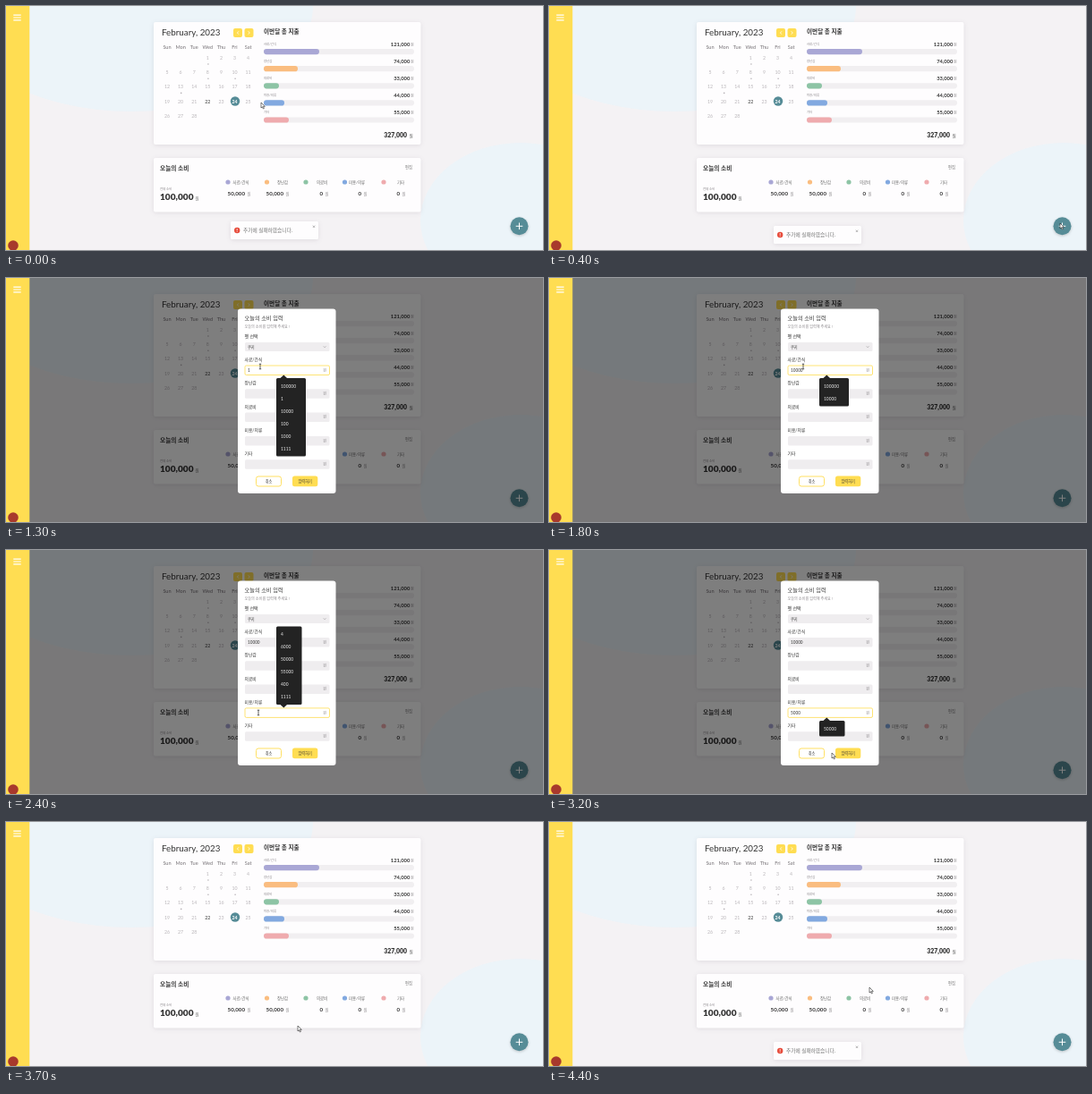
Animation, 600 px wide and 273 px high, one loop 4500 ms. Source, as an HTML page:

```html
<!DOCTYPE html>
<html lang="ko">
<head>
<meta charset="utf-8">
<title>오늘의 소비</title>
<style>
  html, body { margin: 0; width: 100%; height: 100%; overflow: hidden; background: #f4f2f4; }
  svg { display: block; width: 100vw; height: 100vh; }
  text { font-family: Lato, "Noto Sans CJK KR", "Noto Sans CJK", sans-serif; }
  .card { fill: #fefdfe; filter: drop-shadow(0 1.5px 2.5px rgba(60, 50, 70, .11)); }
  .anim { animation: 4.5s step-end infinite; }
</style>
</head>
<body>
<svg id="stage" viewBox="0 0 600 273" preserveAspectRatio="none"></svg>
<script>
const LOOP = 4500, STEP = 100;
const OPEN = 500, CLOSE = 3700;
const YELLOW = '#ffdd52', TEAL = '#568c97', INK = '#333', GRAY = '#8a868a';
const names = ['사료/간식', '장난감', '의료비', '미용/의류', '기타'];
const colors = ['#a9a7d5', '#fabd80', '#8dc4a5', '#82a9e0', '#efabae'];
let css = '', count = 0;

// ---- drawing helpers ----
const text = (x, y, str, size, fill = INK, weight = 400, anchor = 'start') =>
  `<text x="${x}" y="${y}" font-size="${size}" fill="${fill}" font-weight="${weight}" text-anchor="${anchor}">${str}</text>`;
const rect = (x, y, w, h, r, fill, extra = '') =>
  `<rect x="${x}" y="${y}" width="${w}" height="${h}" rx="${r}" fill="${fill}" ${extra}/>`;
const circle = (x, y, r, fill, extra = '') =>
  `<circle cx="${x}" cy="${y}" r="${r}" fill="${fill}" ${extra}/>`;
const line = (d, color, width) =>
  `<path d="${d}" fill="none" stroke="${color}" stroke-width="${width}"/>`;

// ---- motion helpers; key times sit slightly early so each tick is already set ----
const pct = ms => (Math.max(0, ms - 8) / LOOP * 100).toFixed(3) + '%';
const animated = (frames, body) => {
  const name = 'a' + count++;
  css += `@keyframes ${name}{${frames}}`;
  return `<g class="anim" style="animation-name:${name}">${body}</g>`;
};
const show = (from, to, body) => animated(
  `0%,100%{visibility:hidden}${pct(from)}{visibility:visible}${pct(to)}{visibility:hidden}`, body);

function track(points, body) {
  let frames = '';
  for (let t = 0; t < LOOP; t += STEP) {
    const i = points.findLastIndex(p => p[0] <= t);
    const a = points[i], b = points[i + 1] || a;
    const k = b === a ? 0 : (t - a[0]) / (b[0] - a[0]);
    const [x, y] = [1, 2].map(j => +(a[j] + (b[j] - a[j]) * k).toFixed(2));
    frames += `${pct(t)}{transform:translate(${x}px,${y}px)}`;
  }
  return animated(frames, body);
}

// ---- page ----
function calendar() {
  const colX = i => 180 + i * 15.1;
  let s = text(174, 33, 'February, 2023', 9.8);
  for (const x of [254, 266.5]) s += rect(x, 25, 10, 10, 2, YELLOW);
  s += line('M260 28.3l-1.6 1.7 1.6 1.7M270.7 28.3l1.6 1.7-1.6 1.7', '#fff', .8);
  ['Sun', 'Mon', 'Tue', 'Wed', 'Thu', 'Fri', 'Sat'].forEach((d, i) => {
    s += text(colX(i), 47.8, d, 5.6, '#757175', 400, 'middle');
  });
  s += circle(256, 106.5, 5.2, TEAL);
  for (let d = 1; d <= 28; d++) {
    const cell = d + 2, x = colX(cell % 7), y = 60 + Math.floor(cell / 7) * 16.2;
    const fill = d === 24 ? '#fff' : d === 22 ? '#666' : '#b8b4b8';
    s += text(x, y, d, 5.2, fill, d === 22 || d === 24 ? 700 : 400, 'middle');
    if ([1, 8, 10, 13].includes(d)) s += circle(x + .6, y + 5, .8, '#b5b0b5');
  }
  return s;
}

function spending() {
  const amounts = ['121,000', '74,000', '33,000', '44,000', '55,000'];
  const widths = [62, 38, 17, 23, 28];
  let s = text(288, 31, '이번달 총 지출', 6.6, INK, 700);
  names.forEach((n, i) => {
    const y = i * 19.1;
    s += text(288, 44 + y, n, 3.4, GRAY)
      + text(451.3, 45 + y, amounts[i], 5.8, INK, 700, 'end')
      + text(452, 45 + y, '원', 4, GRAY)
      + rect(288, 48 + y, 168, 6.2, 3.1, '#f1eff1')
      + rect(288, 48 + y, widths[i], 6.2, 3.1, colors[i]);
  });
  return s + text(448, 146.5, '327,000', 6.9, INK, 900, 'end') + text(450.5, 146.5, '원', 4.6, '#555');
}

function today() {
  const values = ['50,000', '50,000', '0', '0', '0'];
  const labelX = [262.5, 309, 353, 392, 441], endX = [267, 310, 354, 397, 440];
  let s = text(172, 183.5, '오늘의 소비', 6.7, INK, 700)
    + text(446, 182.3, '편집', 4.4, '#777')
    + text(172, 206, '전체 소비', 3.4, GRAY)
    + text(172, 216.5, '100,000', 10.1, INK, 900)
    + text(211.3, 216.5, '원', 4.8, '#777');
  names.forEach((n, i) => {
    s += circle(248 + i * 43.5, 197, 2.6, colors[i])
      + text(labelX[i], 198.7, n, 4.4, '#666', 400, 'middle')
      + text(endX[i], 212.2, values[i], 6.2, INK, 700, 'end')
      + text(endX[i] + 2.5, 212.2, '원', 4.2, GRAY);
  });
  return s;
}

const page = () => rect(0, 0, 600, 273, 0, '#f4f2f4')
  + '<g fill="#ecf4f9"><ellipse cx="140" cy="0" rx="203" ry="118"/><ellipse cx="575" cy="240" rx="112" ry="87"/></g>'
  + rect(165, 18, 298.5, 137, 2, '', 'class="card"')
  + rect(165, 170, 298.5, 60.5, 2, '', 'class="card"')
  + calendar() + spending() + today()
  + circle(573.5, 246.3, 10, TEAL, 'style="filter:drop-shadow(0 1.5px 1.5px rgba(0,0,0,.2))"')
  + line('M569.7 246.3h7.6M573.5 242.5v7.6', '#fff', 1);

// ---- dialog ----
const fieldY = i => 98 + i * 26.3;
const focusRing = i => rect(267, fieldY(i), 94.5, 10.5, 1.5, '#fff', `stroke="${YELLOW}" stroke-width=".8"`)
  + text(356, fieldY(i) + 6.8, '원', 4, GRAY, 400, 'middle');

function typed(i, start, value) {
  let s = '';
  for (let n = 1; n <= value.length; n++) {
    const from = start + (n - 1) * STEP;
    s += show(from, n < value.length ? from + STEP : CLOSE,
      text(270, fieldY(i) + 7, value.slice(0, n), 4.7));
  }
  return s;
}

function suggest(from, to, top, width, items, below = true) {
  const h = items.length * 14 + 3.5, tip = below ? top : top + h, dir = below ? -3.5 : 3.5;
  let s = rect(302, top, width, h, 1.5, '#232323')
    + `<path d="M306.5 ${tip}L310.3 ${tip + dir}L314 ${tip}z" fill="#232323"/>`;
  items.forEach((v, i) => { s += text(307, top + 10.7 + i * 14, v, 4.9, '#eee'); });
  return show(from, to, s);
}

function dialog() {
  let s = rect(0, 0, 600, 273, 0, '#000', 'opacity=".5"')
    + rect(259, 34.5, 109.5, 206.5, 3, '#fff')
    + text(266.5, 47.2, '오늘의 소비 입력', 6.2)
    + text(266.5, 55.8, '오늘의 소비를 입력해 주세요 !', 4.1, GRAY)
    + text(266.5, 67, '펫 선택', 5)
    + rect(267, 72, 94.5, 10, 1.5, '#efedef')
    + text(270, 78.7, '쿠키', 4.2)
    + line('M354.8 76.4l1.3 1.3 1.3-1.3', GRAY, .6);
  names.forEach((n, i) => {
    const y = fieldY(i);
    s += text(266.5, y - 5, n, 4.8)
      + rect(267, y, 94.5, 10.5, 1.5, '#efedef')
      + text(356, y + 6.8, '원', 4, GRAY, 400, 'middle');
  });
  s += rect(279.5, 222, 28, 11, 2.5, '#fff', `stroke="${YELLOW}" stroke-width=".9"`)
    + text(293.5, 229.2, '취소', 4.2, INK, 400, 'middle')
    + rect(320, 221.6, 28.3, 11.6, 2.5, YELLOW)
    + text(334.2, 229.2, '입력하기', 4.2, INK, 400, 'middle');
  // the visibility of nested parts ends before the dialog closes
  const body = show(OPEN, CLOSE, s);
  return body
    + show(1200, 2300, focusRing(0)) + show(2300, 3400, focusRing(3))
    + typed(0, 1300, '10000') + typed(3, 2600, '5000')
    + suggest(1300, 1400, 112, 33, ['100000', '1', '10000', '100', '1000', '1111'])
    + suggest(1400, 1600, 112, 33, ['100000', '10000', '100', '1000'])
    + suggest(1600, 1700, 112, 33, ['100000', '10000', '1000'])
    + suggest(1700, 2100, 112, 33, ['100000', '10000'])
    + suggest(2400, 2600, 85.5, 28.5, ['4', '6000', '50000', '55000', '400', '1111'], false)
    + suggest(2600, 2700, 191, 28.5, ['50000', '55000'])
    + suggest(2700, 3400, 191, 28.5, ['50000']);
}

// ---- overlays ----
const sidebar = () => rect(0, 0, 26.3, 273, 0, YELLOW)
  + line('M8.3 10.2h8.4M8.3 13h8.4M8.3 15.8h8.4', '#fff', 1.2)
  + circle(8, 268, 5.8, '#a8392c');

const toast = () => track(
  [[0, 0, -5], [100, 0, 0], [700, 0, 0], [800, 0, -4], [900, 0, 36],
    [4200, 0, 36], [4300, 0, -5], [4400, 0, 0]],
  rect(251, 246, 98, 20, 1.5, '', 'class="card"')
  + circle(258.2, 256, 3.2, '#e74c3c')
  + line('M258.2 254.1v2.3M258.2 257.1v.8', '#fff', .8)
  + text(265, 258, '추가에 실패하였습니다.', 5.7, '#757575')
  + line('M342.8 250.6l2.4 2.4M345.2 250.6l-2.4 2.4', '#888', .6));

function pointer() {
  const arrow = '<path d="M0 0v6l1.4-1.2 1 2.2 1-.5-1-2.1h1.9z" fill="#fff" stroke="#222" stroke-width=".6"/>';
  const beam = line('M-1.2-2.8h2.4M0-2.8v5.6M-1.2 2.8h2.4', '#222', .7);
  return track(
    [[0, 285, 108], [300, 571, 243], [400, 571, 243], [500, 549, 228], [900, 284, 102],
      [1100, 284, 99], [2000, 284, 99], [2300, 282, 182], [2900, 282, 182], [3200, 316, 227],
      [3300, 326, 228], [3700, 326, 228], [4400, 358, 185]],
    show(0, 900, arrow) + show(900, 2100, beam) + show(2100, 2300, arrow)
    + show(2300, 3000, beam) + show(3000, LOOP + 8, arrow));
}

const art = page() + dialog() + sidebar() + toast() + pointer();
document.head.appendChild(document.createElement('style')).textContent = css;
document.getElementById('stage').innerHTML = art;
</script>
</body>
</html>
```
